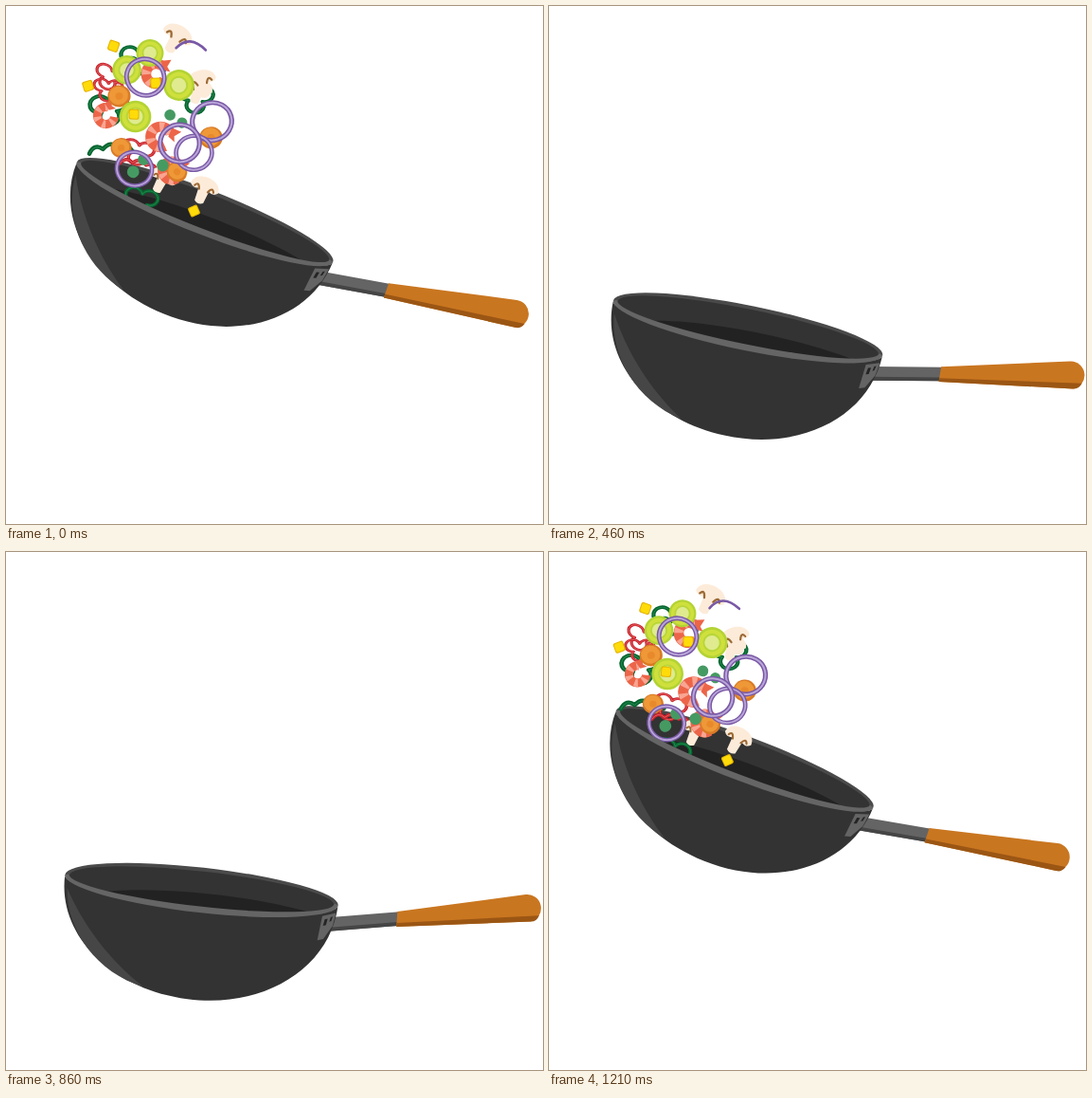
Write an HTML page that moves like this. It is 567 by 546 pixels and loops after 1.23 s.

```html
<!DOCTYPE html>
<html lang="en">
<head>
<meta charset="utf-8">
<title>Wok toss</title>
<style>
html, body { margin: 0; width: 100%; height: 100%; overflow: hidden; background: #fff; }
svg { display: block; width: 100%; height: 100%; }
.line { fill: none; stroke-linecap: round; stroke-linejoin: round; }
</style>
</head>
<body>
<svg viewBox="0 0 567 546">
  <defs>
    <clipPath id="opening">
      <path id="mouth" d="M-145 3 A145 24 -1 0 0 145 -2 L330 -450 H-360 Z"/>
    </clipPath>

    <g id="cuke">
      <circle r="16" fill="#b3d334"/>
      <circle r="13.5" fill="#cfe03c"/>
      <circle r="9.5" fill="#b9d63a"/>
      <circle r="7.5" fill="#dfeb8e"/>
    </g>
    <g id="corn">
      <rect x="-5.5" y="-5.5" width="11" height="11" rx="2" fill="#e3b400"/>
      <rect x="-4.5" y="-4.5" width="9" height="9" rx="2" fill="#ffdb0a"/>
    </g>
    <g id="carrot">
      <circle r="12" fill="#d97b25"/>
      <circle cx="-.5" cy="-.8" r="10" fill="#ee9838"/>
      <circle r="4" fill="#e88a2c"/>
    </g>
    <circle id="pea" r="6" fill="#459a62"/>
    <g id="onion" class="line">
      <circle r="20" stroke="#7958a5" stroke-width="5"/>
      <circle r="20" stroke="#b9a5d8" stroke-width="2"/>
    </g>
    <path id="strand" class="line" d="M-15 2 Q0 -12 16 6" stroke="#7958a5" stroke-width="2.6"/>
    <path id="ring" class="line" d="M0 -9 A10 10 0 1 1 8 4.5 A10 10 0 1 1 -8 4.5 A10 10 0 1 1 0 -9Z"/>
    <path id="wave" class="line" d="M-25 5 Q-19 -7 -9 0 Q0 -10 9 -1 Q18 -7 25 3"/>
    <g id="greenRing"><use href="#ring" stroke="#07642f" stroke-width="4.6"/><use href="#ring" stroke="#259052"/></g>
    <g id="greenWave"><use href="#wave" stroke="#07642f" stroke-width="5"/><use href="#wave" stroke="#259052"/></g>
    <g id="redRing"><use href="#ring" stroke="#c6222c" stroke-width="4"/><use href="#ring" stroke="#ea6a67"/></g>
    <g id="redWave"><use href="#wave" stroke="#c6222c" stroke-width="4.4"/><use href="#wave" stroke="#ea6a67"/></g>
    <g id="shrimp" fill="none">
      <path d="M7 -7 A10 10 0 1 0 8 6" stroke="#ec6549" stroke-width="10"/>
      <path d="M7 -7 A10 10 0 1 0 8 6" stroke="#f9a592" stroke-width="9" stroke-dasharray="4 6"/>
      <path d="M5 -13 L15 -14 L11 -7 L14 -2 L6 -4Z" fill="#ec6549"/>
    </g>
    <g id="mushroom">
      <path d="M-16 0 C-16 -16 16 -16 16 0 Q12 5 6 2 L5 16 Q0 20 -5 16 L-6 2 Q-12 5 -16 0Z" fill="#fdebd9"/>
      <path class="line" d="M-11 1 Q-8 -5 -5 3 M11 1 Q8 -5 5 3" stroke="#9c6a35" stroke-width="2.2"/>
    </g>
  </defs>

  <g id="back">
    <path d="M139 11 L210 -4 V11 L139 26Z" fill="#646464"/>
    <path d="M139 22 L210 7 V11 L139 26Z" fill="#454545"/>
    <path d="M208 -4 L340 -39 A14.5 14.5 0 0 1 349 -11.5 L209 12Z" fill="#c97620"/>
    <path d="M209 8 L357 -19 Q355 -12 349 -11.5 L209 12Z" fill="#9b5614"/>
    <g transform="rotate(-1)">
      <ellipse rx="145" ry="23.5" fill="#4a4a4a"/>
      <ellipse rx="140.5" ry="19.5" fill="#333"/>
      <path d="M-112 16 C-60 0 65 -1 126 13 Q60 23 0 22 Q-65 22 -112 16Z" fill="#222"/>
    </g>
  </g>

  <g id="food" clip-path="url(#opening)"></g>

  <g id="front">
    <path d="M-145 3 A145 21 -1 0 0 145 -2 C145 64 82 116 0 116 C-82 116 -145 66 -145 3Z" fill="#333"/>
    <path d="M-141 16 C-136 61 -98 101 -48 109 C-87 86 -120 52 -141 16Z" fill="#464646"/>
    <path d="M130 11 L144 6 L142 20 L134 35 L128 37Z" fill="#646464"/>
    <path d="M133 14 l3 -1 -1 7 -3 1Z M139 11 l2 -1 -1 5 -2 1Z" fill="#242424"/>
    <path transform="rotate(-1)" d="M-145 0 A145 24 0 0 0 145 0 L141 -1 A141 18.5 0 0 1 -141 -1Z" fill="#656565"/>
  </g>
</svg>
<script>
const LOOP = 1230, GRAVITY = 0.0123;
const $ = id => document.getElementById(id);

// time, centre x, centre y, tilt of the wok
const keys = [
  [0, 210, 217, 22.3], [160, 219.3, 260, 21], [320, 211.5, 315, 14.6], [500, 210, 341, 12.2],
  [690, 210, 333, 11.6], [860, 206.5, 356, 7.4], [1010, 195, 415.5, 0], [1026, 187, 421, 0.3],
  [1075, 162, 354, 9], [1210, 206.5, 218, 21.6]
];

// kind, size, squash, number of scattered pieces, positions of the large ones
const kinds = [
  ['greenRing', .95, .85, 2, [142, 205], [200, 97]],
  ['greenWave', .9, 1, 1, [110, 151]],
  ['redRing', .85, .8, 2, [107, 88]],
  ['redWave', .9, 1, 1],
  ['mushroom', 1, 1, 1, [180, 33], [206, 80], [165, 182], [209, 192]],
  ['shrimp', 1, 1, 2, [158, 72], [105, 116]],
  ['carrot', 1, .95, 1, [121, 150], [216, 139], [180, 175]],
  ['pea', 1, 1, 6],
  ['cuke', 1, 1, 1, [127, 68], [182, 84], [136, 117]],
  ['corn', 1, 1, 2, [113, 43], [86, 85], [198, 216]],
  ['onion', 1, .95, 1, [135, 172], [217, 122], [198, 155], [183, 145]],
  ['strand', 1, 1, 0, [194, 42]]
];

let seed = 11;
const random = () => (seed = seed * 16807 % 2147483647) / 2147483647;
const spread = range => (random() - .5) * range;
const scatter = () => [158 + spread(100), 115 + spread(130)];

const pieces = kinds.flatMap(([kind, size, squash, extra, ...spots]) =>
  [...Array.from({ length: extra }, scatter), ...spots].map(([x, y]) => {
    const el = document.createElementNS('http://www.w3.org/2000/svg', 'use');
    el.setAttribute('href', '#' + kind);
    $('food').append(el);
    const scale = size * (1 + spread(.2));
    return { el, x, y, turn: spread(60), spin: spread(.6), scale: `${scale} ${scale * squash}` };
  }));

// smooth periodic curve through the keys, without overshoot
function wokAt(t) {
  const n = keys.length;
  const key = i => {
    const [time, ...pose] = keys[(i + n) % n];
    return [time + Math.floor(i / n) * LOOP, ...pose];
  };
  const i = keys.findLastIndex(k => k[0] <= t);
  const [a, b, c, d] = [-1, 0, 1, 2].map(j => key(i + j));
  const slope = (p, q, j) => (q[j] - p[j]) / (q[0] - p[0]);
  const mean = (u, v) => u * v > 0 ? 2 * u * v / (u + v) : 0;
  const h = c[0] - b[0], s = (t - b[0]) / h;
  return [1, 2, 3].map(j => {
    const mid = slope(b, c, j);
    const m0 = mean(slope(a, b, j), mid) * h, m1 = mean(mid, slope(c, d, j)) * h;
    const ease = s * s * (3 - 2 * s);
    return b[j] + (c[j] - b[j]) * ease + m0 * s * (1 - s) ** 2 - m1 * s * s * (1 - s);
  });
}

// free flight; the higher and further left a piece is, the faster it rises
function toss({ el, x, y, turn, spin, scale }, t) {
  const vx = .55 - .001 * (x - 155);
  const vy = -.5 + .003 * (y - 100) + .002 * (x - 155);
  const px = x + vx * t, py = y + vy * t + GRAVITY * t * t / 2;
  el.setAttribute('transform',
    `translate(${px} ${py}) rotate(${turn + spin * t}) scale(${scale})`);
}

function draw(t) {
  const [x, y, tilt] = wokAt(t);
  for (const id of ['back', 'front', 'mouth'])
    $(id).setAttribute('transform', `translate(${x} ${y}) rotate(${tilt})`);
  const flying = t < 310 || t > 1050;
  $('food').style.display = flying ? '' : 'none';
  if (flying) pieces.forEach(piece => toss(piece, t > 700 ? t - LOOP : t));
}

const start = performance.now();
function tick() {
  draw((performance.now() - start) % LOOP);
  requestAnimationFrame(tick);
}
tick();
</script>
</body>
</html>
```
